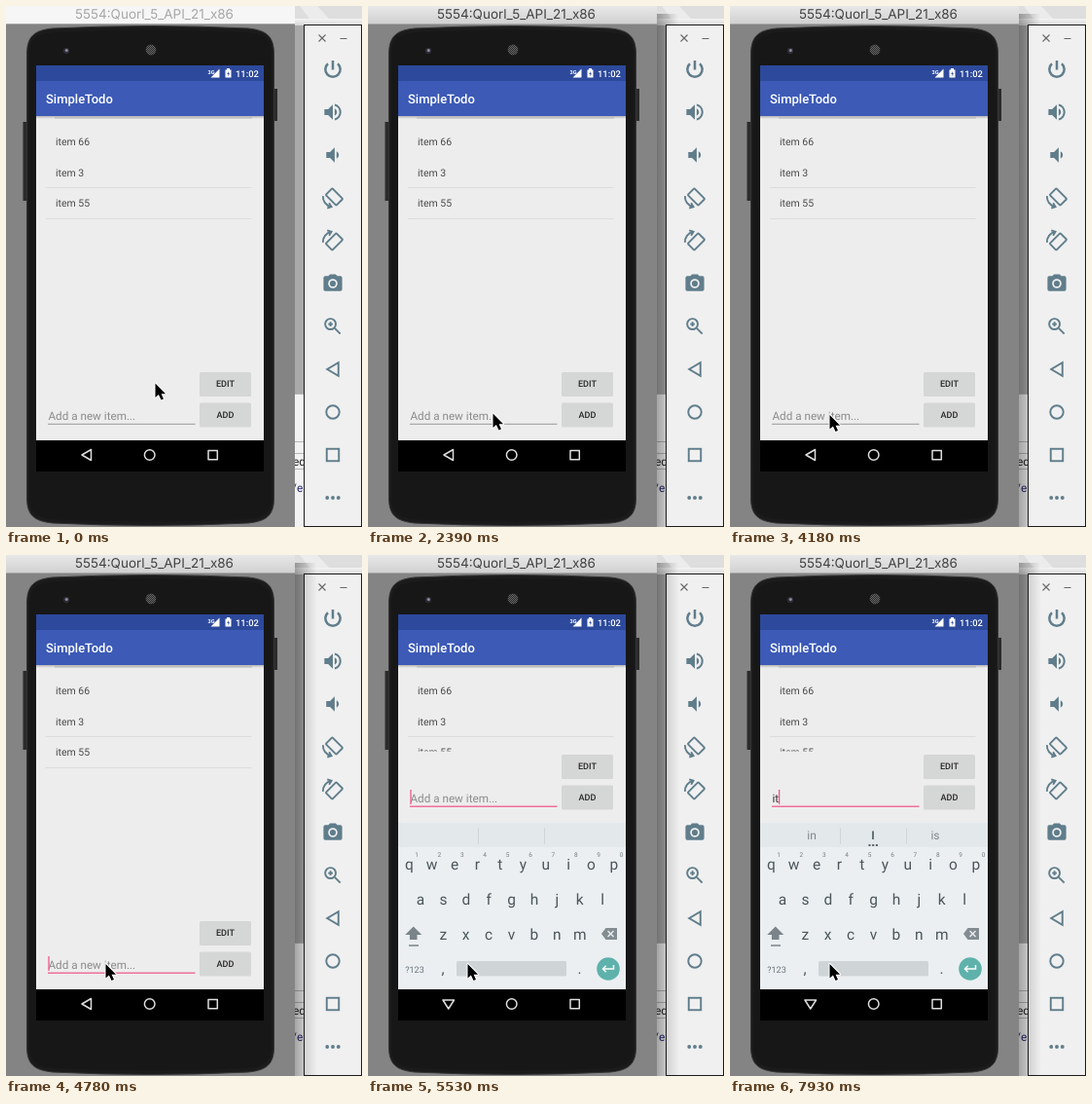
Write an HTML page that moves like this. It is 366 px wide and 535 px high and loops after 8000 ms.

```html
<!DOCTYPE html>
<html lang="en">
<head>
<meta charset="utf-8">
<title>Todo app in an emulator</title>
<style>
html, body { margin: 0; width: 100%; height: 100%; overflow: hidden; background: #fff; }
svg { display: block; width: 366px; height: 535px; }
text { font-family: Roboto, sans-serif; text-rendering: geometricPrecision; }
.mid { text-anchor: middle; }
.icon { fill: #607d8b; }
.line { fill: none; stroke: #607d8b; stroke-width: 2; }
.nav { fill: none; stroke: #dedede; stroke-width: 1.5; stroke-linejoin: round; }
.key { font-size: 15.5px; fill: #4b555a; }
.tip { font-size: 6.5px; fill: #737d82; }
</style>
</head>
<body>
<svg viewBox="0 0 366 535">
  <defs>
    <linearGradient id="bar" x2="0" y2="1"><stop stop-color="#e8e8e8"/><stop offset="1" stop-color="#d1d1d1"/></linearGradient>
    <linearGradient id="shade"><stop stop-color="#000" stop-opacity=".32"/><stop offset="1" stop-color="#000" stop-opacity="0"/></linearGradient>
    <linearGradient id="drop" x2="0" y2="1"><stop stop-color="#000" stop-opacity=".24"/><stop offset="1" stop-color="#000" stop-opacity="0"/></linearGradient>
    <linearGradient id="halo" x2="0" y2="1"><stop stop-color="#f4f4f4"/><stop offset="1" stop-color="#d6d6d6"/></linearGradient>
    <pattern id="mesh" width="2" height="2" patternUnits="userSpaceOnUse"><path d="M0 0h1v1H0zM1 1h1v1H1z" fill="#666"/></pattern>
    <clipPath id="listClip"><rect id="listBox" x="31" y="113" width="234" height="260"/></clipPath>
    <clipPath id="screenClip"><rect x="31" y="61" width="234" height="417"/></clipPath>
  </defs>

  <!-- desktop behind -->
  <rect x="297" width="69" height="13" fill="#dedede"/>
  <path d="M302 0h18l12 13h-20z" fill="#ececec"/>
  <rect x="297" y="13" width="69" height="7" fill="url(#halo)"/>
  <rect x="297" y="20" width="10" height="378" fill="#a9a9a9"/>
  <rect x="297" y="398" width="10" height="137" fill="#f2f2f2"/>
  <path d="M297 398.500h10M297 447.500h10M297 459.500h10M297 475.500h10" stroke="#b5b5b5"/>
  <text x="295" y="472" font-size="12" fill="#222">ed</text>
  <text x="294" y="499" font-size="12" fill="#26276e">/e</text>
  <rect id="backShade" x="297" y="8" width="22" height="527" fill="url(#shade)"/>

  <!-- tool strip -->
  <rect x="306.500" y="19.500" width="59" height="515" fill="#f0f0f0" stroke="#1b1b1b"/>
  <path d="M321.500 29.500l7 7m0-7l-7 7M343.500 33.500h7" stroke="#666" stroke-width="1.100"/>
  <g id="tools"></g>
  <rect id="frontShade" x="307" y="20" width="13" height="514" fill="url(#shade)" opacity=".4"/>

  <!-- emulator window -->
  <rect y="18" width="297" height="517" fill="#848484"/>
  <rect id="titleBar" width="297" height="18"/>
  <path d="M0 18.500h297" stroke="#a9a9a9"/>
  <text id="title" class="mid" x="152.500" y="13" style="font:13.500px Inter, sans-serif">5554:Quorl_5_API_21_x86</text>
  <path d="M17.500 119h4v81h-4zM275 85h4v33h-4z" fill="#2b2b2b"/>
  <path d="M21.500 50C21.500 31 29 25 48 23Q149 18 249 23C268 25 275.500 31 275.500 50V505C275.500 523 268 529 249 531Q149 536 48 531C29 529 21.500 523 21.500 505Z" fill="#1b1b1b" stroke="#343434"/>
  <path d="M24 51C24 34 31 29 49 27Q149 22 248 27C266 29 273 34 273 51V504C273 520 266 525 248 527Q149 532 49 527C31 525 24 520 24 504Z" fill="#171717"/>
  <circle cx="62" cy="46" r="3.200" fill="#2c2b30"/><circle cx="62.300" cy="45.600" r="1.600" fill="#8886a0"/>
  <circle cx="149" cy="45" r="5.700" fill="#292929"/><circle cx="149" cy="45" r="5.200" fill="url(#mesh)"/>

  <g clip-path="url(#screenClip)">
    <rect x="31" y="61" width="234" height="417" fill="#ededed"/>
    <g clip-path="url(#listClip)" font-size="10.500" fill="#4a4a4a">
      <path d="M50 115h203" stroke="#d2d2d2" stroke-width="1.500"/>
      <path d="M41 186.500h211.500M41 218.500h211.500" stroke="#dcdcdc"/>
      <text x="51" y="143">item 66</text>
      <text x="51" y="174.500">item 3</text>
      <text x="51" y="206">item 55</text>
    </g>
    <rect x="31" y="113" width="234" height="3" fill="url(#drop)"/>
    <rect x="31" y="61" width="234" height="16" fill="#2d499b"/>
    <rect x="31" y="77" width="234" height="36" fill="#3c5ab6"/>
    <text x="41" y="100" font-size="13" font-weight="500" fill="#fff">SimpleTodo</text>
    <text x="236" y="72.500" font-size="9.400" font-weight="500" fill="#fff">11:02</text>
    <text x="207.500" y="69.500" font-size="5.500" font-weight="700" fill="#fff">3G</text>
    <path d="M219.500 64.500v9h-9zM225.500 65.500h1.500v-1.500h3v1.500h1.500v8h-6z" fill="#fff"/>
    <path d="M228.800 67l-1.500 3h1.200v2.200l1.500-3h-1.200z" fill="#2d499b"/>

    <g id="form">
      <g fill="#d5d6d6"><rect x="199" y="376" width="53" height="25" rx="1.500"/><rect x="199" y="407.500" width="53" height="25" rx="1.500"/></g>
      <g class="mid" font-size="9.100" font-weight="500" fill="#262626"><text x="225.500" y="391.300">EDIT</text><text x="225.500" y="422.700">ADD</text></g>
      <text id="field" x="43.500" y="424.500" font-size="11.700"></text>
      <path id="rule" d="M43 429.300h151.500"/>
      <path id="caret" d="M44 412v15" stroke="#f0568c" stroke-width="1.300"/>
    </g>

    <rect x="31" y="446" width="234" height="32" fill="#000"/>
    <g id="board">
      <rect x="31" y="275" width="234" height="171" fill="#ebeff2"/>
      <rect x="31" y="275" width="234" height="25" fill="#e3e8eb"/>
      <path d="M113.500 280v17M181.500 280v17" stroke="#cfd5d8"/>
      <g id="hints" class="mid" font-size="12" fill="#7d878c">
        <text x="84" y="292">in</text>
        <text x="147" y="292" font-weight="700" fill="#566167">I</text>
        <text x="211" y="292">is</text>
        <path d="M142.500 297h2v2h-2zM146.200 297h2v2h-2zM149.900 297h2v2h-2z" fill="#566167"/>
      </g>
      <g id="keys" class="mid"></g>
      <path d="M46.700 381.500l-8.500 8.500h4.700v5h7.600v-5h4.700z" fill="#7a8489"/>
      <path d="M42 401h10" stroke="#7a8489" stroke-width="1.500"/>
      <path d="M240 389l4.500-6h11.500v12h-11.500z" fill="#828c91"/>
      <path d="M246.500 386l6 6m0-6l-6 6" stroke="#ebeff2" stroke-width="1.400"/>
      <text class="mid" x="48" y="428.500" font-size="9" fill="#69747a">?123</text>
      <rect x="91" y="417" width="113" height="15.500" rx="1.500" fill="#cfd4d7"/>
      <circle cx="247" cy="425" r="11.800" fill="#5eb2ab"/>
      <path d="M252.500 421v4h-11m3.200-3.200l-3.200 3.200 3.200 3.200" fill="none" stroke="#fff" stroke-width="1.500"/>
    </g>
    <path id="back" class="nav"/>
    <circle class="nav" cx="147.700" cy="461" r="5.300"/>
    <rect class="nav" x="208" y="456.500" width="9.300" height="9.300"/>
  </g>

  <path id="mouse" d="M0 0V14.500L3.400 11.600 6 17 8.500 15.900 6.100 10.700H10.600Z" fill="#000" stroke="#fff" stroke-width="2" stroke-linejoin="round" paint-order="stroke"/>
</svg>
<script>
const LOOP = 8000;
const $ = id => document.getElementById(id);
const set = (id, attrs) => {
  for (const name in attrs) $(id).setAttribute(name, attrs[name]);
};
const show = (id, on) => set(id, { visibility: on ? 'visible' : 'hidden' });

// Tool icons, each in a 24-unit box
const turned = flip => `<g transform="translate(12 12) scale(1 ${flip})">
  <rect class="line" x="-5" y="-8" width="10" height="16" rx="1" transform="translate(1.500 1) rotate(45)"/>
  <path class="line" d="M-10.500 2A11 11 0 0 1 -2 -9.500M-6 -11l4.500 1.500-2.500 4" stroke-width="1.600"/></g>`;
const solid = d => `<path class="icon" fill-rule="evenodd" d="${d}"/>`;
const line = (d, width = 2) => `<path class="line" d="${d}" style="stroke-width:${width}"/>`;
const tools = [
  line('M12 2.500v10M6.800 6a8 8 0 1 0 10.400 0', 2.600),
  solid('M3 9v6h4l5 5V4L7 9zM16.500 12A4.500 4.500 0 0 0 14 8v8a4.500 4.500 0 0 0 2.500-4zM14 3.200v2.100a7 7 0 0 1 0 13.400v2.100a9 9 0 0 0 0-17.600z'),
  solid('M18.500 12A4.500 4.500 0 0 0 16 8v8a4.500 4.500 0 0 0 2.500-4zM5 9v6h4l5 5V4L9 9z'),
  turned(-1),
  turned(1),
  solid('M9 2L7.200 4H4a2 2 0 0 0-2 2v12a2 2 0 0 0 2 2h16a2 2 0 0 0 2-2V6a2 2 0 0 0-2-2h-3.200L15 2zM12 17a5 5 0 1 1 0-10 5 5 0 0 1 0 10z') +
    '<circle class="icon" cx="12" cy="12" r="3.200"/>',
  '<circle class="line" cx="9.500" cy="9.500" r="5.700"/>' + line('M14 14l6 6M9.500 7v5M7 9.500h5'),
  line('M18 5v14L6 12z'),
  '<circle class="line" cx="12" cy="12" r="7"/>',
  '<rect class="line" x="5.500" y="5.500" width="13" height="13"/>',
  [6, 12, 18].map(x => `<circle class="icon" cx="${x}" cy="12" r="2"/>`).join('')
];
$('tools').innerHTML = tools.map((icon, i) =>
  `<g transform="translate(336 ${65 + 44 * i}) scale(.96) translate(-12 -12)">${icon}</g>`).join('');

// Keyboard letters
const letter = (c, x, y, type = 'key') => `<text class="${type}" x="${x}" y="${y}">${c}</text>`;
const row = (chars, x, y, type) => [...chars].map((c, i) => letter(c, x + 23.4 * i, y, type)).join('');
$('keys').innerHTML = row('qwertyuiop', 42.3, 323) + row('1234567890', 50, 310, 'tip') +
  row('asdfghjkl', 54, 358.5) + row('zxcvbnm', 77.3, 394.5) +
  letter(',', 77, 430) + letter('.', 217.5, 430);

// Pointer stops: time, x, y
const stops = [
  [0, 153.5, 387.5], [150, 152, 393], [300, 148, 403], [450, 143, 412], [590, 140, 416.5],
  [740, 139, 417.5], [1790, 134, 418], [1940, 129.5, 418], [2390, 128.5, 418.5],
  [2540, 127, 418.5], [2840, 126.3, 418.5], [3140, 122, 418.5], [3290, 114, 418.5],
  [3440, 107, 419], [3580, 104, 419], [3880, 102.5, 420]
];
// Times at which the caret toggles, starting hidden
const blinks = [4480, 5080, 5530, 6130, 6580, 7030, 7630];

function draw(t) {
  const [, x, y] = stops.filter(s => s[0] <= t).pop();
  set('mouse', { transform: `translate(${x} ${y})` });

  const active = t >= 1040;
  set('titleBar', { fill: active ? 'url(#bar)' : '#f6f6f6' });
  set('title', { fill: active ? '#404040' : '#a6a6a6' });
  show('backShade', active);
  show('frontShade', t >= 4330);

  const open = t >= 4930;
  set('form', { transform: `translate(0 ${open ? -171 : 0})` });
  set('listBox', { height: open ? 88.5 : 260 });
  set('back', { d: open ? 'M77 457h11.500l-5.750 9z' : 'M87.500 455.500v11l-9.500-5.500z' });

  const sliding = t < 5230;
  show('board', t >= 5080);
  set('board', { opacity: sliding ? 0.55 : 1, transform: `translate(0 ${sliding ? 26 : 0})` });
  show('hints', t >= 7780);

  const focused = t >= 4480;
  set('rule', { stroke: focused ? '#f0709b' : '#999', 'stroke-width': focused ? 1.6 : 1 });

  const typed = t >= 7930 ? 'it' : t >= 7630 ? 'i' : '';
  $('field').textContent = typed || 'Add a new item...';
  set('field', { fill: typed ? '#333' : '#8b8b8b' });
  set('caret', { transform: `translate(${[0, 2.6, 6.6][typed.length]} 0)` });
  show('caret', blinks.filter(b => b <= t).length % 2);
}

const start = performance.now();
function tick() {
  draw((performance.now() - start) % LOOP);
  requestAnimationFrame(tick);
}
tick();
</script>
</body>
</html>
```
